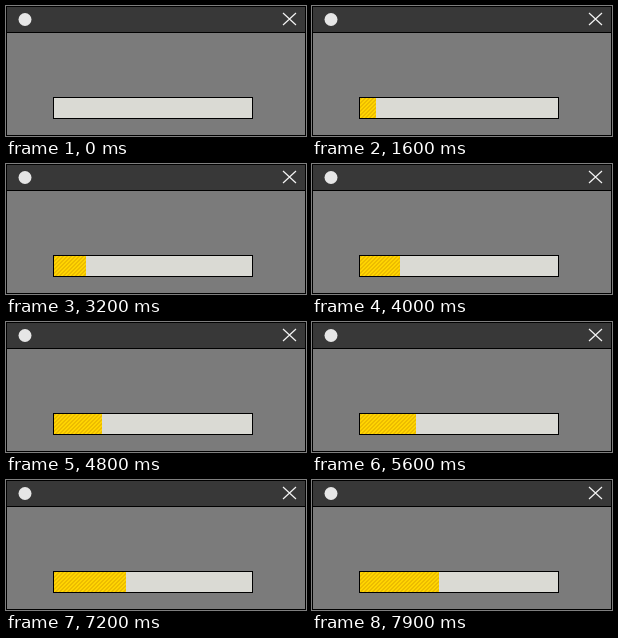
Animation, 300 px wide and 130 px high, one loop 8 s. Source, as an HTML page with a canvas:

```html
<!DOCTYPE html>
<html lang="en">
<head>
<meta charset="utf-8">
<title>Progress</title>
<style>
html, body { margin: 0; width: 100%; height: 100%; overflow: hidden; background: #7b7b7b; }
canvas { display: block; width: 300px; height: 130px; }
</style>
</head>
<body>
<canvas id="stage" width="300" height="130"></canvas>
<script>
const ctx = document.getElementById('stage').getContext('2d');
const LOOP = 8000, STEP = 100;
const BAR = { x: 48, y: 92, w: 198, h: 20 };
const PERIOD = 4;

function rect(color, x, y, w, h) {
  ctx.fillStyle = color;
  ctx.fillRect(x, y, w, h);
}

function drawWindow() {
  rect('#000', 0, 0, 300, 130);
  rect('#383838', 1, 1, 298, 25);
  rect('#7b7b7b', 1, 27, 298, 102);

  ctx.fillStyle = '#e6e6e6';
  ctx.beginPath();
  ctx.arc(19, 13.5, 6.5, 0, Math.PI * 2);
  ctx.fill();

  ctx.strokeStyle = '#f2f2f2';
  ctx.lineWidth = 1.2;
  ctx.beginPath();
  ctx.moveTo(277, 7);
  ctx.lineTo(290, 19);
  ctx.moveTo(290, 7);
  ctx.lineTo(277, 19);
  ctx.stroke();
}

function drawBar(step) {
  const { x, y, w, h } = BAR;
  rect('#000', x - 1, y - 1, w + 2, h + 2);
  rect('#dadad4', x, y, w, h);
  rect('#ffd500', x, y, step, h);

  // diagonal hatch travelling with the leading edge
  ctx.fillStyle = '#ecbc00';
  for (let j = 0; j < h; j++) {
    for (let i = 0; i < step; i++) {
      const phase = (i + j - step + LOOP) % PERIOD;
      if (phase < 2) ctx.fillRect(x + i, y + j, 1, 1);
    }
  }
}

function render(now) {
  const step = Math.floor((now % LOOP) / STEP);
  drawWindow();
  drawBar(step);
}

const start = performance.now();
function tick() {
  render(performance.now() - start);
  requestAnimationFrame(tick);
}
tick();
</script>
</body>
</html>
```
